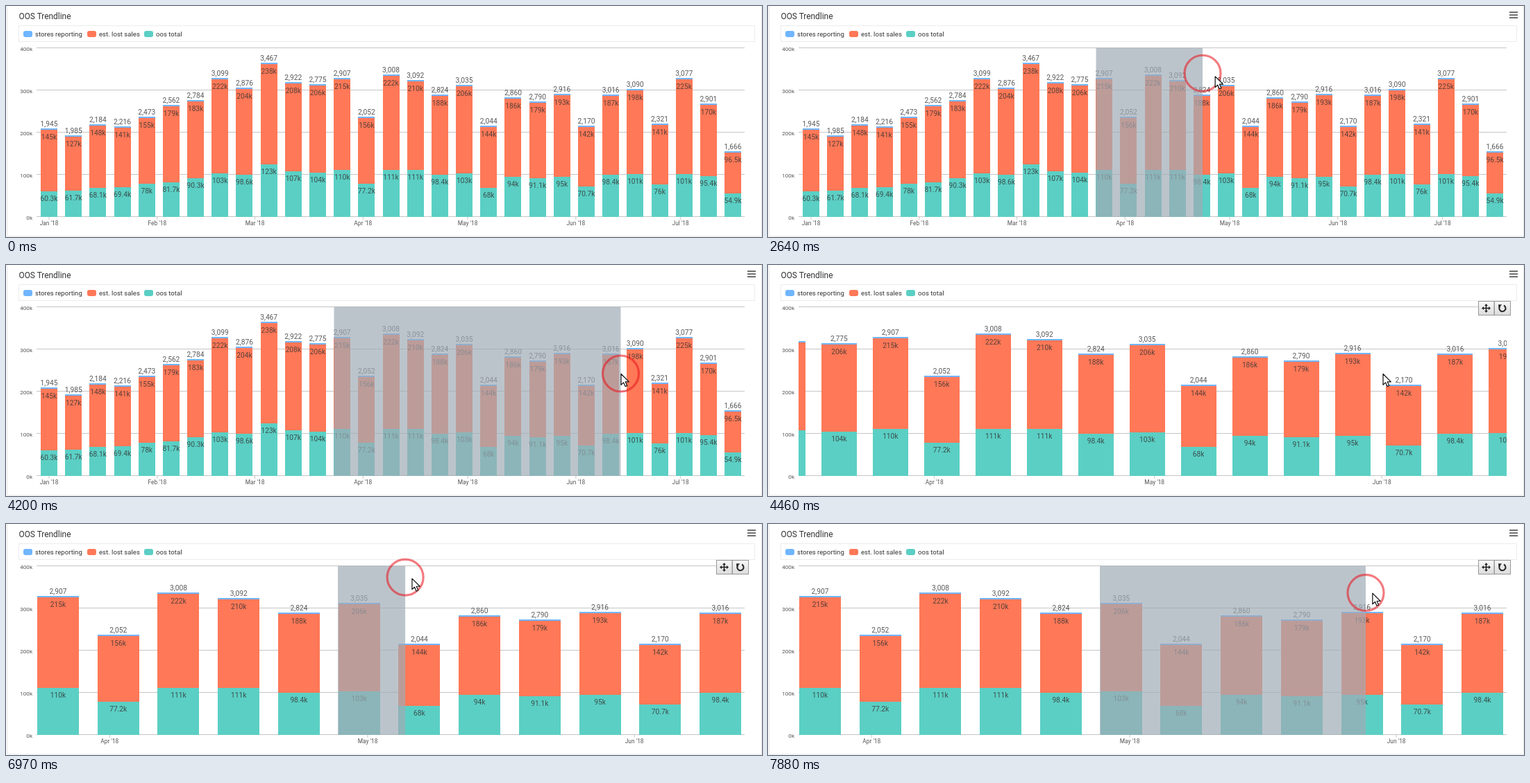
Write an HTML page that moves like this. It is 1089 px wide and 334 px high and loops after 8 s.

```html
<!DOCTYPE html>
<html lang="en">
<head>
<meta charset="utf-8">
<title>OOS Trendline</title>
<style>
html, body { margin: 0; width: 100%; height: 100%; overflow: hidden; background: #fff; }
svg { display: block; width: 1089px; height: 334px; font-family: Roboto, sans-serif; }
</style>
</head>
<body>
<svg id="stage" viewBox="0 0 1089 334" xmlns="http://www.w3.org/2000/svg">
  <defs>
    <clipPath id="plot"><rect x="44" y="56" width="1020" height="250"/></clipPath>
    <linearGradient id="face" x2="0" y2="1">
      <stop offset="0" stop-color="#f8f8f8"/><stop offset="1" stop-color="#dcdcdc"/>
    </linearGradient>
  </defs>
  <rect width="1089" height="334" fill="#fff"/>
  <rect x="1.5" y="-1.5" width="1087" height="334.5" fill="none" stroke="#e6e6e6"/>
  <text x="18.5" y="18.5" font-size="11.9" fill="#333">OOS Trendline</text>
  <rect x="18.5" y="28.5" width="1060" height="23" fill="none" stroke="#ececec"/>
  <g id="legend" font-size="9.6" fill="#333"></g>
  <g id="grid" font-size="8.1" fill="#555"></g>
  <g clip-path="url(#plot)"><g id="bars" font-size="10.2" text-anchor="middle"></g></g>
  <g id="months" font-size="8.4" fill="#555" text-anchor="middle"></g>
  <g id="buttons">
    <rect x="1023.5" y="52.5" width="22.5" height="20" fill="url(#face)" stroke="#999"/>
    <rect x="1046.5" y="52.5" width="23" height="20" fill="url(#face)" stroke="#999"/>
    <g fill="none" stroke="#222" stroke-width="1.6">
      <path d="M1034.5 58V67M1030 62.5H1039"/>
      <path d="M1054.6 59.4A4.6 4.6 0 1 0 1060 58.5" stroke-width="2"/>
    </g>
    <path d="M1034.5 56l2.4 3h-4.8zM1034.5 69l2.4-3h-4.8zM1028 62.5l3-2.4v4.8zM1041 62.5l-3-2.4v4.8zM1052 57.2h5.2l-4.6 4.8z" fill="#222"/>
  </g>
  <path id="menu" d="M1068 9h12M1068 13h12M1068 17h12" stroke="#707070" stroke-width="1.8"/>
  <rect id="select" y="60.5" height="244.5" fill="#a0abb5" fill-opacity=".7"/>
  <circle id="ring" r="26" fill="none" stroke="#e8141e" stroke-opacity=".56" stroke-width="3.2"/>
  <path id="cursor" d="M.5 .5V16.3L4.1 12.9L6.6 18.6L9.3 17.4L6.8 11.9H11.8Z" fill="#fff" stroke="#111" stroke-width="1.2" stroke-linejoin="round"/>
</svg>
<script>
const LOOP = 8000, STEP = 131, WEEK = 7;
const BLUE = '#70b5ff', ORANGE = '#ff7857', TEAL = '#5bcfc4';

// the two weekly series, in thousands
const sales = [145, 127, 148, 141, 155, 179, 183, 222, 204, 238, 208, 206, 215, 156, 222,
  210, 188, 206, 144, 186, 179, 193, 142, 187, 198, 141, 225, 170, 96.5];
const oos = [60.3, 61.7, 68.1, 69.4, 78, 81.7, 90.3, 103, 98.6, 123, 107, 104, 110, 77.2, 111,
  111, 98.4, 103, 68, 94, 91.1, 95, 70.7, 98.4, 101, 76, 101, 95.4, 54.9];
// stores follow from the out-of-stock rate, which drifts up and peaks in spring
const rate = i => 31 + 0.07 * i + 6 * Math.exp(-(((i - 12) / 4.5) ** 2));
const stores = oos.map((v, i) => Math.round(v * 1000 / rate(i)));

// x of day 0, pixels per day, bar width
const full = { x0: 62, day: 35.18 / WEEK, width: 24 };
const zoomed = { x0: 75 - 12 * 86.73, day: 86.73 / WEEK, width: 60 };

// pointer moves; ease holds the ease-out power for x and for y
const home = { x: 600, y: -22 };
const moves = [
  { start: 260, end: 1570, x: 473, y: 62, ease: [2, 2] },
  { start: 2370, end: 3670, x: 885.5, y: 157, ease: [2.5, 2.5] },
  { start: 4590, end: 5520, x: 477.5, y: 62, ease: [2, 2] },
  { start: 6600, end: LOOP, x: 914, y: 100, ease: [1, 2] }];
const drags = [
  { press: 2370, move: 2510, release: 4330, x: 472.5 },
  { press: 6570, move: 6710, release: LOOP, x: 478 }];

const $ = id => document.getElementById(id);
const yOf = v => Math.round(304.5 - v * 0.61);
const mix = (a, b, p) => a + (b - a) * p;
const part = (t, start, end) => Math.min(1, Math.max(0, (t - start) / (end - start)));
const easeOut = (p, power) => 1 - (1 - p) ** power;

function add(parent, tag, attrs, text) {
  const el = document.createElementNS('http://www.w3.org/2000/svg', tag);
  set(el, attrs);
  if (text !== undefined) el.textContent = text;
  parent.appendChild(el);
  return el;
}
function set(el, attrs) {
  for (const k in attrs) el.setAttribute(k, attrs[k]);
}
function show(el, on) {
  el.style.display = on ? '' : 'none';
}

[[25, BLUE, 'stores reporting'], [117, ORANGE, 'est. lost sales'], [199, TEAL, 'oos total']].forEach(([x, fill, name]) => {
  add($('legend'), 'rect', { x, y: 36, width: 13, height: 9, rx: 3, fill });
  add($('legend'), 'text', { x: x + 17, y: 44 }, name);
});

for (let v = 0; v <= 400; v += 100) {
  const y = 304.5 - v * 0.61;
  add($('grid'), 'path', { d: `M44 ${y}H1064`, stroke: '#c6c6c6' });
  add($('grid'), 'text', { x: 38, y: y + 4, 'text-anchor': 'end' }, v + 'k');
}

const bars = stores.map((n, i) => {
  const low = yOf(oos[i]), mid = yOf(oos[i] + sales[i]), top = mid - 2;
  const rects = [[top, mid, BLUE], [mid, low, ORANGE], [low, 305, TEAL]].map(
    ([y, end, fill]) => add($('bars'), 'rect', { y, height: end - y, fill }));
  const labels = [[top - 3.4, n.toLocaleString('en-US')], [mid + 14, sales[i] + 'k'], [low + 14, oos[i] + 'k']].map(
    ([y, text]) => add($('bars'), 'text', { y, fill: '#333', 'fill-opacity': 0.82 }, text));
  return { rects, labels };
});

const firstOfMonth = m => (Date.UTC(2018, m) - Date.UTC(2018, 0)) / 864e5;
const ticks = ['Jan', 'Feb', 'Mar', 'Apr', 'May', 'Jun', 'Jul'].map((name, m) => {
  const g = add($('months'), 'g', {});
  add(g, 'path', { d: 'M0 305V309', stroke: '#c6c6c6' });
  add(g, 'text', { y: 316.5 }, name + " '18");
  return { g, day: firstOfMonth(m) };
});

function pointer(t) {
  let { x, y } = home;
  for (const m of moves) {
    const p = part(t, m.start, m.end);
    x = mix(x, m.x, easeOut(p, m.ease[0]));
    y = mix(y, m.y, easeOut(p, m.ease[1]));
  }
  return [x, y];
}

function drawChart(p) {
  const x0 = mix(full.x0, zoomed.x0, p), day = mix(full.day, zoomed.day, p);
  const width = Math.round(mix(full.width, zoomed.width, p));
  bars.forEach(({ rects, labels }, i) => {
    const x = x0 + day * WEEK * i;
    rects.forEach(r => set(r, { x: Math.round(x - width / 2), width }));
    labels.forEach(l => set(l, { x }));
  });
  ticks.forEach(({ g, day: d }) => {
    const x = x0 + day * d;
    set(g, { transform: `translate(${x})` });
    show(g, x > 44 && x < 1064);
  });
}

function draw(time) {
  const t = Math.floor(time / STEP) * STEP;

  const p = part(t, 4200, 4580);
  drawChart((1 - Math.cos(Math.PI * p)) / 2);
  show($('buttons'), time >= 4330);
  show($('menu'), time >= 130);

  const [x, y] = pointer(t);
  set($('cursor'), { transform: `translate(${x} ${y})` });

  // the ring and the selection trail slightly behind the pointer
  const drag = drags.find(d => time >= d.press && time < d.release);
  show($('ring'), drag);
  show($('select'), drag && time >= drag.move);
  if (drag) {
    const [cx, cy] = pointer(t - 30);
    set($('ring'), { cx, cy });
    set($('select'), { x: drag.x, width: Math.max(0, cx - drag.x) });
  }
}

const begin = performance.now();
function frame() {
  draw((performance.now() - begin) % LOOP);
  requestAnimationFrame(frame);
}
frame();
</script>
</body>
</html>
```
